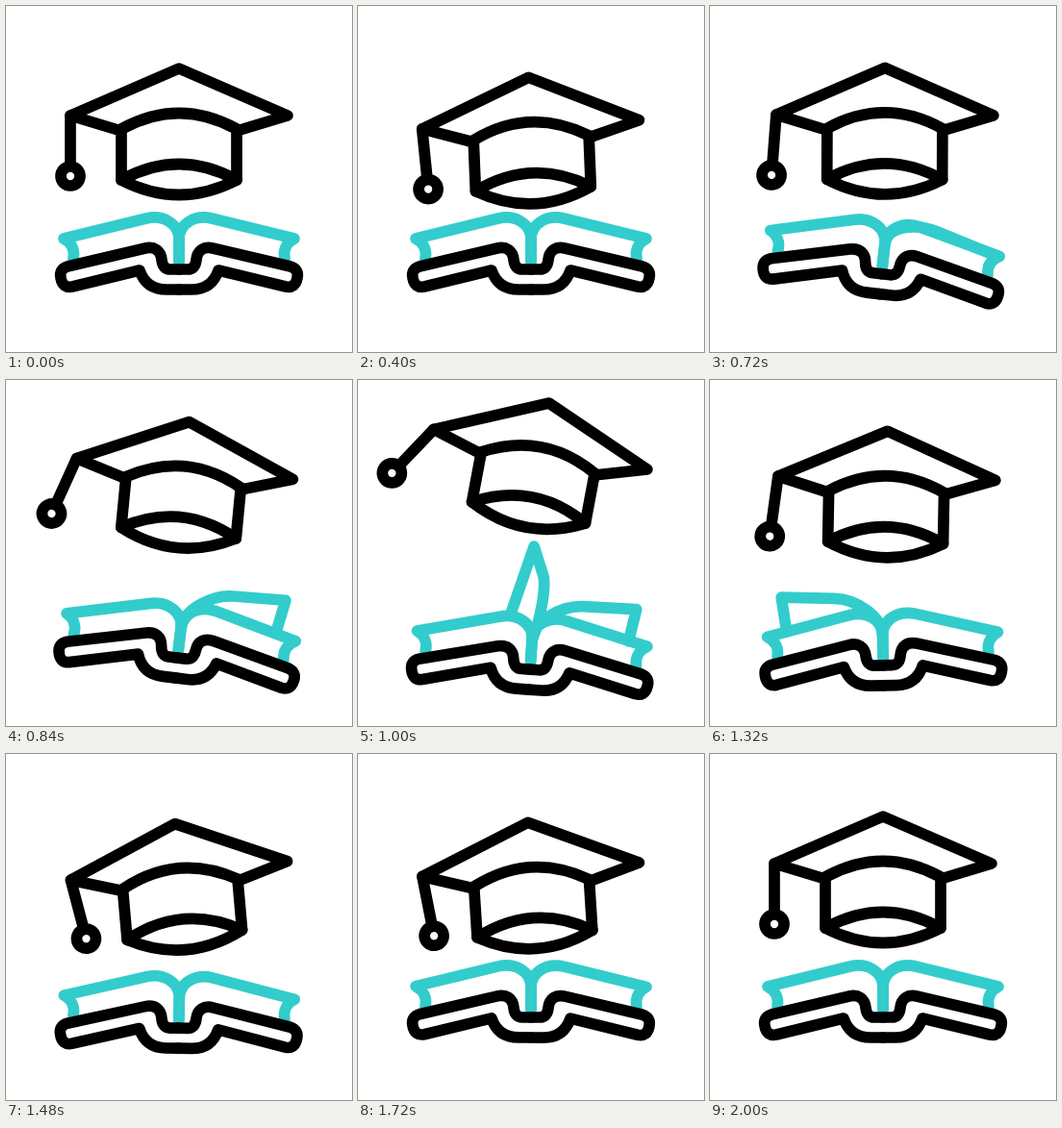
An HTML page for the animation above (2.2 s loop, 360 px wide and 360 px high).

```html
<!DOCTYPE html>
<html lang="en">
<head>
<meta charset="utf-8">
<title>Graduation cap and book</title>
<style>
  html, body { margin: 0; width: 100%; height: 100%; overflow: hidden; background: #fff; }
  svg { display: block; width: 100%; height: 100%; }
  svg * { fill: none; stroke-width: 11.7; stroke-linecap: round; stroke-linejoin: round; }
  .ink { stroke: #000; }
  .paper { stroke: #33cccc; }
</style>
</head>
<body>
<svg viewBox="0 0 360 360">
  <g id="book">
    <g class="paper">
      <path id="sheet" d="M180 266V243C180 226 163 217 146 221L60 242C68 246 72 254 70 263"/>
      <use href="#sheet" transform="matrix(-1 0 0 1 360 0)"/>
      <path id="pageA"/>
      <path id="pageB"/>
    </g>
    <g class="ink">
      <path id="cover" d="M180 274H171Q163 274 162 264C161 254 154 250 145 252L64 271Q55 274 57 283Q59 294 69 292L139 275C143 287 151 295 167 295H180"/>
      <use href="#cover" transform="matrix(-1 0 0 1 360 0)"/>
    </g>
  </g>
  <g id="cap" class="ink">
    <path d="M120 130L67 114L180 65L293 114L240 130"/>
    <path d="M120 181V128Q180 95 240 128V181"/>
    <path d="M120 181Q180 148 240 181Q180 212 120 181Z"/>
    <g id="tassel">
      <path d="M67 114V164"/>
      <circle cx="67" cy="177" r="10"/>
    </g>
  </g>
</svg>
<script>
const LOOP = 2200, STEP = 40;
const el = id => document.getElementById(id);

const span = (t, from, to) => Math.min(1, Math.max(0, (t - from) / (to - from)));
const easeOut = u => u * (2 - u);
const ease = (t, from, to) => {
  const u = span(t, from, to);
  return u * u * (3 - 2 * u);
};

// Cap poses: x, y, tilt, tassel swing
const rest = [0, 0, 0, 0];
const crouch = [-.5, 12, -3, -4.5];
const peak = [10, -42.5, 10.8, 33.5];
const dip = [-.5, 10, -5.8, -12];
const mix = (a, b, u) => a.map((v, i) => v + (b[i] - v) * u);

function capPose(t) {
  let pose = mix(rest, crouch, easeOut(span(t, 200, 580)));
  pose = mix(pose, peak, ease(t, 580, 1030));
  pose = mix(pose, dip, ease(t, 1030, 1550));
  return mix(pose, rest, ease(t, 1550, 1960));
}

// The book is pushed down, rocks right, left, right and levels out
const bookDrop = t => 28.5 * (ease(t, 600, 1060) - ease(t, 1160, 1720));
const bookLean = t => 7.2 * ease(t, 480, 780) - 8.5 * ease(t, 780, 1300)
  + 2.3 * ease(t, 1300, 1480) - ease(t, 1480, 1800);

// A page swings about the spine on a flattened arc; upright, it bows most
function pagePath(turn) {
  if (turn <= 0 || turn >= 1) return "";
  const c = Math.cos(turn * Math.PI), s = Math.sin(turn * Math.PI), bow = s ** 4;
  const tip = [116 * c, -97 * s];
  const fold = [55 * c + 9 * bow, -18 - 50 * s];
  const edge = [110 * c - 19 * bow, 10 - 38 * s];
  const root = [7 * bow, -20];
  const handle = mix(fold, tip, -.4);
  const at = ([x, y]) => `${180 + x} ${243 + y}`;
  return `M180 243C${at(root)} ${at(handle)} ${at(fold)}L${at(tip)}L${at(edge)}`;
}

function draw(t) {
  const [x, y, tilt, swing] = capPose(t);
  el("cap").setAttribute("transform", `translate(${x} ${y}) rotate(${tilt} 180 114)`);
  el("tassel").setAttribute("transform", `rotate(${swing} 67 114)`);
  el("book").setAttribute("transform",
    `translate(0 ${bookDrop(t)}) rotate(${bookLean(t)} 180 260)`);
  el("pageA").setAttribute("d", pagePath(ease(t, 700, 1290)));
  el("pageB").setAttribute("d", pagePath(ease(t, 864, 1462)));
}

const start = performance.now();
function tick() {
  const t = (performance.now() - start) % LOOP;
  draw(Math.floor(t / STEP) * STEP);
  requestAnimationFrame(tick);
}
tick();
</script>
</body>
</html>
```
